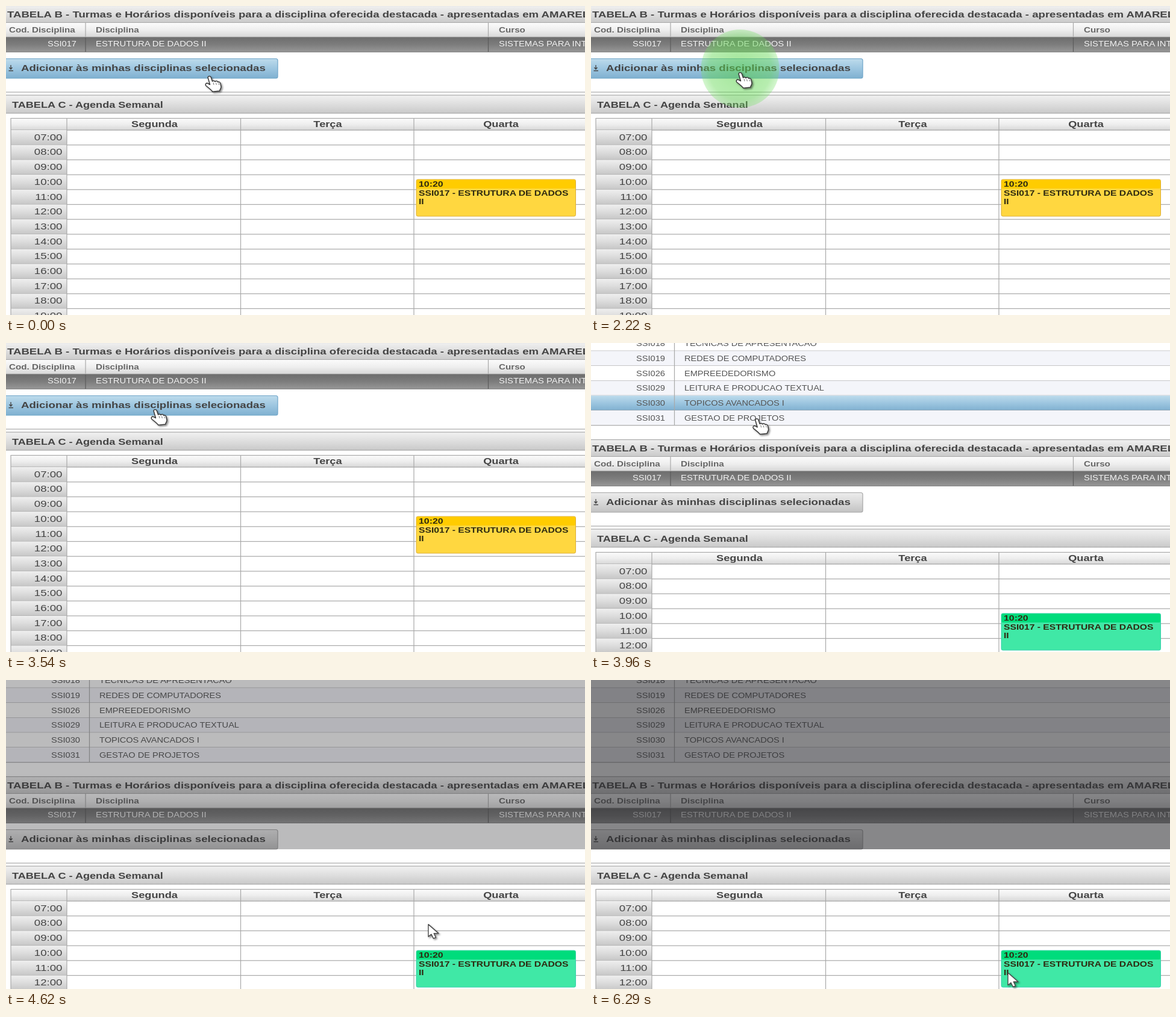
An HTML page that plays this animation: 961 by 513 pixels, repeating every 6.37 s.

```html
<!DOCTYPE html>
<html lang="pt">
<head>
<meta charset="utf-8">
<title>Agenda Semanal</title>
<style>
html, body { margin: 0; width: 100%; height: 100%; overflow: hidden; background: #fff; }
svg { display: block; width: 100vw; height: 100vh; }
text { font-family: "Liberation Sans", Arial, sans-serif; }
#hand, #arrow { filter: drop-shadow(2.5px 2px 1.5px rgba(0, 0, 0, .45)); }
</style>
</head>
<body>
<svg id="stage" viewBox="0 0 961 513" preserveAspectRatio="none"></svg>
<script>
const LOOP = 6370;
const ASPECT = 1.22;
const SCROLL_AT = 3710, SCROLL_BY = 161;
const ROW = 24.7, GRID_TOP = 206;
const LINE = '#a9a9a9';

const rect = (x, y, w, h, fill, extra = '') =>
  `<rect x="${x}" y="${y}" width="${w}" height="${h}" fill="${fill}" ${extra}/>`;
const hLine = (y, x = 0, color = LINE) => rect(x, y - .6, 970 - x, 1.2, color);
const vLine = (x, y, h, color = LINE) => rect(x - .6, y, 1.2, h, color);
const label = (x, y, size, fill, str, { bold = false, anchor = 'start' } = {}) =>
  `<text transform="translate(${x} ${y}) scale(${ASPECT} 1)" font-size="${size}" fill="${fill}"
    font-weight="${bold ? 700 : 400}" text-anchor="${anchor}">${str}</text>`;
const fade = (id, ...colors) =>
  `<linearGradient id="${id}" x1="0" y1="0" x2="0" y2="1">${colors.map((c, i) =>
    `<stop offset="${i / (colors.length - 1)}" stop-color="${c}"/>`).join('')}</linearGradient>`;

const BOLD = { bold: true };
const MIDDLE = { bold: true, anchor: 'middle' };
const END = { anchor: 'end' };

const defs = `<defs>
  ${fade('bar', '#f1f1f1', '#dedede', '#c9c9c9')}
  ${fade('head', '#fbfbfb', '#eeeeee', '#d6d6d6')}
  ${fade('cell', '#efefef', '#dcdcdc', '#c6c6c6')}
  ${fade('dark', '#6d6d6d', '#7d7d7d', '#989898')}
  ${fade('blue', '#bddbec', '#9dc6e0', '#7fb0d0')}
  ${fade('grey', '#ececec', '#d9d9d9', '#c2c2c2')}
  <radialGradient id="glow">
    <stop offset="0" stop-color="#55cf45" stop-opacity=".55"/>
    <stop offset=".8" stop-color="#62d852" stop-opacity=".46"/>
    <stop offset="1" stop-color="#70e060" stop-opacity=".3"/>
  </radialGradient>
</defs>`;

function courseList() {
  const rows = [
    ['SSI018', 'TECNICAS DE APRESENTACAO'],
    ['SSI019', 'REDES DE COMPUTADORES'],
    ['SSI026', 'EMPREEDEDORISMO'],
    ['SSI029', 'LEITURA E PRODUCAO TEXTUAL'],
    ['SSI030', 'TOPICOS AVANCADOS I'],
    ['SSI031', 'GESTAO DE PROJETOS']
  ];
  const top = -172.5;
  return rows.map(([code, name], i) => {
    const y = top + i * ROW;
    const hover = i === 4 ? rect(0, y, 961, ROW, 'url(#blue)', 'id="hover"') : '';
    return rect(0, y, 961, ROW, i % 2 ? '#f4f5fa' : '#fff') + hover + hLine(y + ROW) +
      label(123, y + 16.6, 12, '#555', code, END) +
      label(155, y + 16.6, 11.95, '#555', name);
  }).join('') + vLine(138.5, top, 6 * ROW);
}

function classTable() {
  return rect(0, -1, 961, 29, 'url(#bar)') + hLine(-.5) + hLine(27.6) +
    label(2, 19.3, 15.25, '#444',
      'TABELA B - Turmas e Horários disponíveis para a disciplina oferecida destacada - apresentadas em AMARELO', BOLD) +
    rect(0, 28, 961, 24, 'url(#head)') +
    rect(0, 52, 961, 24.5, 'url(#dark)') + hLine(52, 0, '#777') + hLine(76.3, 0, '#858585') +
    [132, 800.5].map(x => vLine(x, 28, 24) + vLine(x, 52, 24, '#5c5c5c')).join('') +
    label(5, 44, 12.45, '#666', 'Cod. Disciplina', BOLD) +
    label(149, 44, 12.45, '#666', 'Disciplina', BOLD) +
    label(818, 44, 12.45, '#666', 'Curso', BOLD) +
    label(117, 67.3, 12, '#f2f2f2', 'SSI017', END) +
    label(149, 67.3, 12.15, '#f2f2f2', 'ESTRUTURA DE DADOS II') +
    label(818, 67.3, 12.15, '#f2f2f2', 'SISTEMAS PARA INTERNET');
}

function addButton() {
  return rect(-6, 87.5, 457, 32.5, 'url(#blue)', 'id="button" rx="3" stroke-width="1.2"') +
    '<path d="M8 98v6M5.5 102l2.5 3l2.5-3M4.5 107.5h7.5" fill="none" stroke="#444" stroke-width="1.3"/>' +
    label(25, 108, 15.28, '#444', 'Adicionar às minhas disciplinas selecionadas', BOLD);
}

function agenda() {
  const days = [['Segunda', 246.5], ['Terça', 534], ['Quarta', 821.5]];
  let out = hLine(143) + rect(0, 148, 961, 30, 'url(#bar)') + hLine(148) + hLine(178) +
    label(10, 169.2, 14.85, '#444', 'TABELA C - Agenda Semanal', BOLD) +
    rect(8, 186.5, 960, 20, 'url(#head)') + hLine(186.5, 8) + hLine(GRID_TOP, 8);
  for (let i = 0; i < 13; i++) {
    const y = GRID_TOP + i * ROW;
    out += rect(8, y, 93, ROW, 'url(#cell)') + hLine(y + ROW, 8) +
      label(93.5, y + 16.7, 15.3, '#444', String(7 + i).padStart(2, '0') + ':00', END);
  }
  out += [8, 101, 389.5, 677].map(x => vLine(x, 186, 345)).join('');
  return out + days.map(([d, x]) => label(x, 201, 14.95, '#444', d, MIDDLE)).join('');
}

function classEvent() {
  return rect(681, 288, 264.5, 61, '#ffd740', 'id="body" rx="2.5"') +
    rect(681.5, 288.5, 263.5, 14.6, '#ffcc00', 'id="cap" rx="2"') +
    label(685, 300.2, 13, '#2e2a10', '10:20', BOLD) +
    label(685, 314.5, 12.85, '#2e2a10', 'SSI017 - ESTRUTURA DE DADOS', BOLD) +
    label(685, 328.5, 12.85, '#2e2a10', 'II', BOLD);
}

const pointers = `
  <g id="hand"><path transform="translate(-6 -1)" fill="#fff" stroke="#3a3a3a" stroke-width="1.5" stroke-linejoin="round"
    d="M5 3.5C6 .8 9.5 1 10.3 3.5L12.5 10C14 8.6 16 9 17 10.5C18.5 9 21 9.4 21.7 11.2C24 10.2 25.6 12 26 14L27 19C27 22 25 23.5 24.5 26L13 27.3C10 23.5 6 20.5 2 17.5C0 15 2.4 12.2 5 13.5L8.5 15.5Z"/>
    <path d="M8 11l1 4M12.5 11.5l.8 3.5M17 12l.7 3" fill="none" stroke="#777"/></g>
  <path id="arrow" d="M0 0V20.5L5 16.5L8.5 23.5L12.5 21.8L9.3 15H17Z"
    fill="#fff" stroke="#484848" stroke-width="1.4" stroke-linejoin="round"/>`;

const stage = document.getElementById('stage');
stage.innerHTML = defs + rect(0, 0, 961, 513, '#fff') +
  `<g id="page">${courseList()}${classTable()}${addButton()}${agenda()}${classEvent()}</g>` +
  '<circle id="click" cx="247.5" cy="104" r="65" fill="url(#glow)"/>' +
  `<g id="pointer">${pointers}</g>` + rect(0, 0, 961, 281, '#2a2a2d', 'id="dim"');

const el = id => document.getElementById(id);
const set = (id, attrs) => {
  for (const k in attrs) el(id).setAttribute(k, attrs[k]);
};
const show = (id, on) => set(id, { visibility: on ? 'visible' : 'hidden' });

// Bursts of recorded change: start, end, number of steps.
const bursts = [
  [130, 300, 3], [580, 1150, 8], [2220, 2480, 4], [3200, 3790, 8],
  [3870, 4470, 8], [4560, 5150, 9], [5230, 5680, 7], [5830, 6290, 7]
];

function snap(t) {
  let last = 0;
  for (const [start, end, n] of bursts) {
    if (t < start) break;
    const step = (end - start) / (n - 1);
    last = start + step * Math.min(n - 1, Math.floor((t - start) / step + 1e-6));
  }
  return last;
}

const linear = u => u;
const easeOut = u => u * (2 - u);
const smooth = u => u * u * (3 - 2 * u);

// Pointer tip: time, x, y, easing towards this point.
const path = [
  [0, 336, 116], [80, 336, 116, linear], [300, 322, 115, linear],
  [510, 322, 115, linear], [1150, 246, 110, smooth],
  [3865, 246, 110, linear], [3955, 273, 125, linear], [4298, 567, 263, linear],
  [4850, 752, 460, easeOut], [5150, 752, 460, linear],
  [5680, 830, 475, smooth], [5750, 830, 475, linear], [6290, 692, 486, smooth]
];

function tipAt(t) {
  const i = path.findIndex(p => p[0] > t);
  if (i < 0) return path[path.length - 1].slice(1, 3);
  const [t0, x0, y0] = path[i - 1];
  const [t1, x1, y1, ease] = path[i];
  const u = ease((t - t0) / (t1 - t0));
  return [x0 + (x1 - x0) * u, y0 + (y1 - y0) * u];
}

function draw(time) {
  const t = snap(time);
  const added = time >= SCROLL_AT;
  const leftList = t >= 4000;
  const [x, y] = tipAt(t);

  set('page', { transform: `translate(0 ${added ? SCROLL_BY : 0})` });
  set('button', added
    ? { fill: 'url(#grey)', stroke: '#a6a6a6' }
    : { fill: 'url(#blue)', stroke: '#6fa5c8' });
  set('body', added
    ? { fill: '#40e8a6', stroke: '#3ccfae' }
    : { fill: '#ffd740', stroke: '#dcae38' });
  set('cap', { fill: added ? '#00dc7c' : '#ffcc00' });
  show('hover', !leftList);
  show('hand', !leftList);
  show('arrow', leftList);
  set('pointer', { transform: `translate(${x} ${y})` });
  set('click', { opacity: t >= 2219 ? Math.max(0, 1 - (t - 2220) / 260) : 0 });
  set('dim', { opacity: Math.min(.56, Math.max(0, (t - 4124) * .00073)) });
}

const begin = performance.now();
function tick() {
  draw((performance.now() - begin) % LOOP);
  requestAnimationFrame(tick);
}
tick();
</script>
</body>
</html>
```
